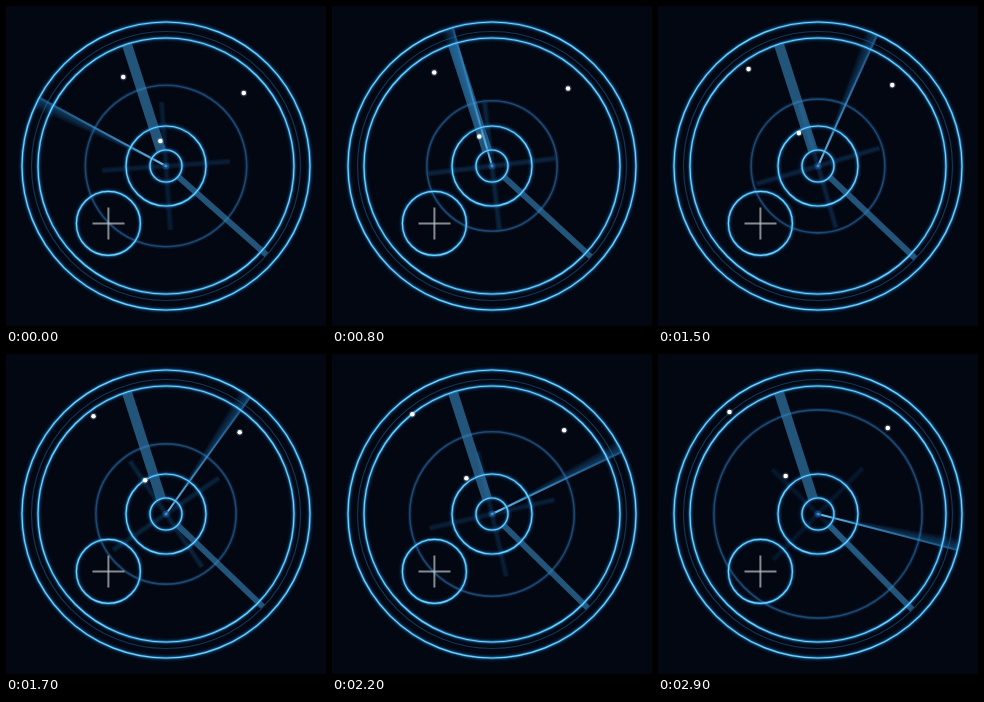
Animation of 320x320 px, one loop 3000 ms. Source, as an HTML page with a canvas:

```html
<!DOCTYPE html>
<html lang="en">
<head>
<meta charset="utf-8">
<title>Radar</title>
<style>
  html, body { margin: 0; width: 100%; height: 100%; overflow: hidden; background: #020712; }
  canvas { display: block; width: 320px; height: 320px; }
</style>
</head>
<body>
<canvas id="radar" width="320" height="320"></canvas>
<script>
const ctx = document.getElementById('radar').getContext('2d');
const LOOP = 3000, STEP = 100, C = 160, RAD = Math.PI / 180;

// Start point, speed and acceleration of each blip; vertical motion is shared.
const blips = [
  { x: 117.3, y: 71, v: -20, a: 1.45 },
  { x: 237.8, y: 87, v: -1.9, a: -0.3 },
  { x: 154.4, y: 135, v: -8.7, a: -0.18 }
];

function ring(x, y, r, color, width) {
  ctx.beginPath();
  ctx.arc(x, y, r, 0, 2 * Math.PI);
  ctx.strokeStyle = color;
  ctx.lineWidth = width;
  ctx.stroke();
}

function glowRing(x, y, r) {
  ring(x, y, r, 'rgba(20,90,160,0.10)', 8);
  ring(x, y, r, 'rgba(25,110,180,0.28)', 4.5);
  ring(x, y, r, 'rgba(50,150,215,0.5)', 2.6);
  ring(x, y, r, '#6fd6ff', 1.2);
}

function line(x1, y1, x2, y2, color, width) {
  ctx.beginPath();
  ctx.moveTo(x1, y1);
  ctx.lineTo(x2, y2);
  ctx.strokeStyle = color;
  ctx.lineWidth = width;
  ctx.stroke();
}

function ray(angle, from, to, color, width) {
  const c = Math.cos(angle), s = Math.sin(angle);
  line(C + from * c, C + from * s, C + to * c, C + to * s, color, width);
}

function disc(x, y, r, color) {
  ctx.beginPath();
  ctx.arc(x, y, r, 0, 2 * Math.PI);
  ctx.fillStyle = color;
  ctx.fill();
}

function background() {
  ctx.fillStyle = '#020712';
  ctx.fillRect(0, 0, 320, 320);
}

function spinner(swing) {
  const angle = -Math.PI * (1 + swing);
  const alpha = 0.17 - 0.06 * (1 + swing);
  for (let i = 0; i < 4; i++) {
    const a = angle + i * Math.PI / 2;
    ray(a, 0, 64, `rgba(30,95,155,${alpha})`, 6);
    ray(a, 0, 64, `rgba(30,95,155,${alpha})`, 3);
  }
}

function sweep(angle) {
  const trail = 5 * RAD, parts = 10;
  for (let i = 0; i < parts; i++) {
    const a = angle - trail * (1 - i / parts);
    ctx.beginPath();
    ctx.moveTo(C, C);
    ctx.arc(C, C, 144, a, angle + 0.3 * RAD);
    ctx.fillStyle = 'rgba(45,130,195,0.055)';
    ctx.fill();
  }
  const fade = ctx.createRadialGradient(C, C, 0, C, C, 144);
  fade.addColorStop(0, 'rgba(110,205,255,0.95)');
  fade.addColorStop(0.35, 'rgba(75,165,225,0.7)');
  fade.addColorStop(1, 'rgba(50,130,190,0.3)');
  ray(angle - 0.3 * RAD, 0, 144, fade, 2);
}

function draw(t) {
  const angle = 3.64 + t;
  const swing = Math.sin(angle);
  const beam = 'rgba(56,137,190,0.6)';

  background();
  spinner(swing);
  ring(C, C, 96 + 32 * swing, 'rgba(30,90,150,0.22)', 4);
  ring(C, C, 96 + 32 * swing, 'rgba(50,120,180,0.5)', 1.6);
  ring(C, C, 134.5, 'rgba(40,110,165,0.45)', 1.2);

  ray(252.2 * RAD, 16, 128, beam, 10);
  ray((41.5 + 1.33 * t) * RAD, 16, 134, beam, 6);
  sweep(angle);

  for (const r of [144, 128, 40, 16]) glowRing(C, C, r);
  glowRing(102.4, 217.4, 32);
  line(86.5, 217.4, 118.5, 217.4, 'rgba(190,195,200,0.7)', 2);
  line(102.4, 201.5, 102.4, 233.5, 'rgba(190,195,200,0.7)', 2);

  disc(C, C, 3.6, 'rgba(20,75,135,0.7)');
  disc(C, C, 1.6, 'rgba(70,155,220,0.8)');

  for (const b of blips) {
    const x = b.x + b.v * t + b.a * t * t;
    const y = b.y - 6.08 * t + 0.553 * t * t;
    disc(x, y, 3.4, 'rgba(150,190,220,0.25)');
    disc(x, y, 2.3, '#fff');
  }
}

function tick() {
  const now = performance.now() % LOOP;
  draw(Math.floor(now / STEP) * STEP / 1000);
  requestAnimationFrame(tick);
}
tick();
</script>
</body>
</html>
```
